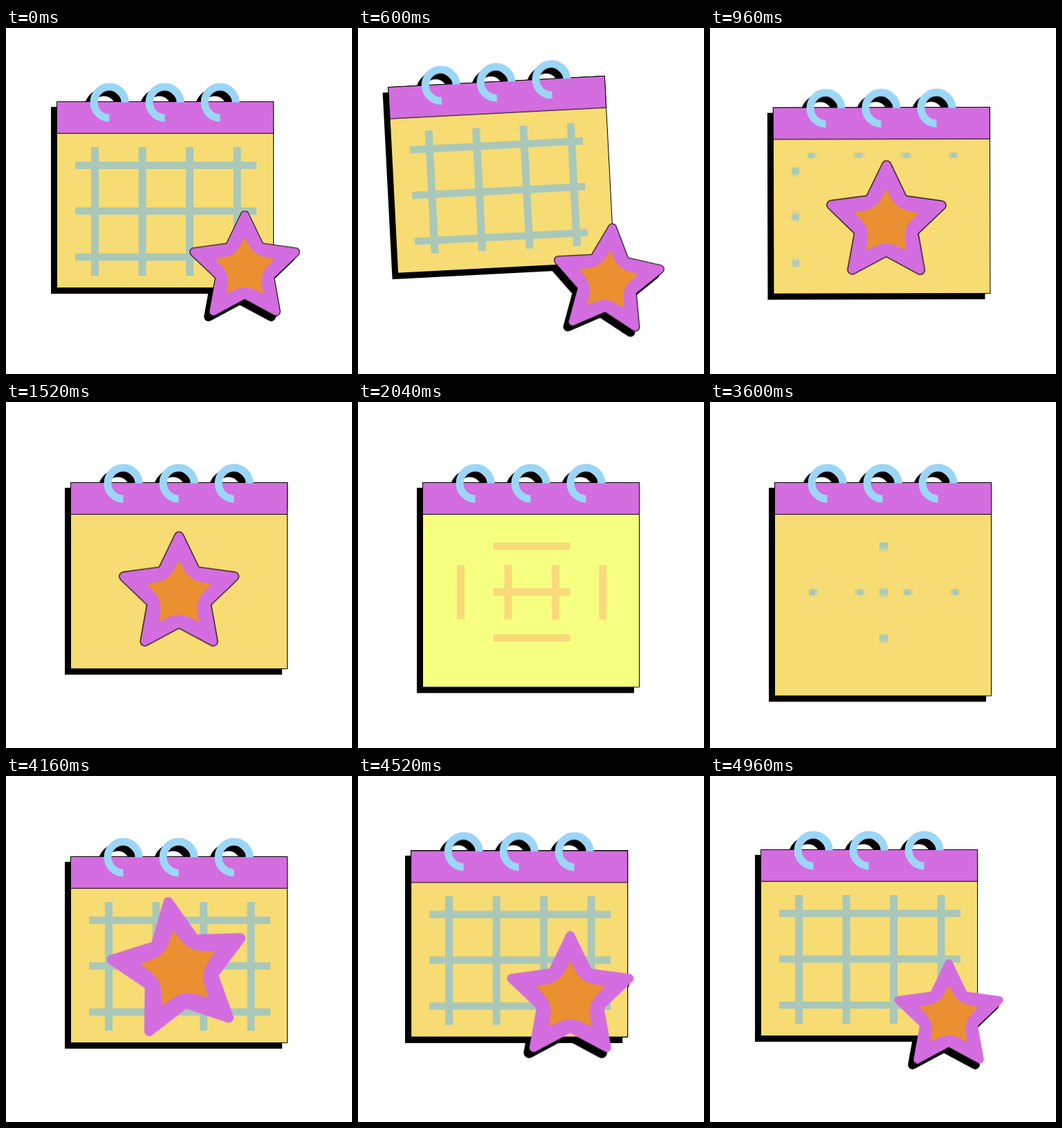
Animation of 500x500 px, one loop 5000 ms. Source, as an HTML page:

```html
<!DOCTYPE html>
<html lang="en">
<head>
<meta charset="utf-8">
<title>Calendar star</title>
<style>
  html, body { margin: 0; width: 100%; height: 100%; overflow: hidden; background: #fff; }
  svg { display: block; width: 100%; height: 100%; stroke-linejoin: round; }

  .cal, .star1, .star2, .drop2, .drop3, .mini, .gx, .gy {
    animation: 5s cubic-bezier(.333, 0, .667, 1) infinite both;
  }
  .edge { stroke: #000; vector-effect: non-scaling-stroke; }
  .sun { fill: #f7dc73; }
  .lime { fill: #f7ff80; }
  .teal { stroke: #a9c8b9; }
  .sand { stroke: #f8da7a; }
  .black { fill: #000; stroke: #000; stroke-width: 13.2; }
  .pink { fill: #d36de0; stroke: #d36de0; stroke-width: 11; }
  .orange { fill: #ea9031; }

  .cal { animation-name: sway; transform-origin: 250px 251px; }
  @keyframes sway {
    0%, 100% { transform: translate(-20px, -10px) rotate(0deg); }
    10.8% { transform: translate(-45px, -41px) rotate(-3.1deg); }
    20.4%, 83.2% { transform: translate(0px, 0px) rotate(0deg); }
    92.8% { transform: translate(-20px, -10px) rotate(0deg); }
  }

  .star1 { animation-name: gather; }
  @keyframes gather {
    0% { transform: translate(345px, 347.5px) rotate(0deg) scale(1); visibility: visible; }
    10.8% { transform: translate(366px, 370px) rotate(5.2deg) scale(1); }
    20.4% { transform: translate(250px, 278px) rotate(0deg) scale(1.09); }
    40%, 100% { transform: translate(250px, 278px) rotate(0deg) scale(1.09); visibility: hidden; }
  }

  .star2 { animation-name: burst; }
  @keyframes burst {
    0%, 79.2% {
      transform: translate(251px, 280px) rotate(-120deg) scale(0);
      animation-timing-function: cubic-bezier(.333, .667, .667, 1);
    }
    84.8% { transform: translate(251px, 280px) rotate(0deg) scale(1.4); }
    94.8%, 100% { transform: translate(345px, 347.5px) rotate(0deg) scale(1); }
  }

  /* A fresh page falls from the header, overshoots and settles. */
  .drop2 { animation-name: drop2; }
  .drop3 { animation-name: drop3; }
  .page { transform-origin: 0 116.5px; }
  .shade { transform-origin: 0 124.5px; }
  @keyframes drop2 {
    0%, 29% { transform: scaleY(0); }
    35.4% { transform: scaleY(1.169); }
    47.6%, 100% { transform: scaleY(1); }
  }
  @keyframes drop3 {
    0%, 63.2% { transform: scaleY(0); }
    69.6% { transform: scaleY(1.169); }
    80%, 100% { transform: scaleY(1); }
  }

  /* The first grid retracts to its top left ends, later ones grow from the middle. */
  .gx, .gy { transform-origin: 251px 275px; }
  .g1 .gx, .g1 .gy { transform-origin: 120px 182px; }
  .g1 .gx { animation-name: out1x; }
  .g1 .gy { animation-name: out1y; }
  .g2 .gx { animation-name: in2x; }
  .g2 .gy { animation-name: in2y; }
  .g3 .gx { animation-name: in3x; }
  .g3 .gy { animation-name: in3y; }
  @keyframes out1x { 0%, 10.8% { transform: scaleX(1); } 20.4%, 100% { transform: scaleX(0); } }
  @keyframes out1y { 0%, 10.8% { transform: scaleY(1); } 20.4%, 100% { transform: scaleY(0); } }
  @keyframes in2x { 0%, 36.6% { transform: scaleX(0); } 46%, 100% { transform: scaleX(1); } }
  @keyframes in2y { 0%, 36.6% { transform: scaleY(0); } 46%, 100% { transform: scaleY(1); } }
  @keyframes in3x { 0%, 70.8% { transform: scaleX(0); } 80%, 100% { transform: scaleX(1); } }
  @keyframes in3y { 0%, 70.8% { transform: scaleY(0); } 80%, 100% { transform: scaleY(1); } }

  .mini { fill: #ea9031; stroke: #332a20; stroke-width: .7; stroke-linejoin: miter; }
  .m1 { animation-name: pop1; }
  .m2 { animation-name: pop2; }
  @keyframes pop1 { 0%, 47.6% { transform: scale(0); } 54%, 100% { transform: scale(1); } }
  @keyframes pop2 { 0%, 54% { transform: scale(0); } 60.4%, 100% { transform: scale(1); } }
</style>
</head>
<body>
<svg viewBox="0 0 500 500">
  <defs>
    <path id="body"/>
    <path id="core"/>
    <path id="spark"/>
    <path id="rows" d="M120 208.5H382M120 274.5H382M120 341H382" fill="none" stroke-width="10.5"/>
    <path id="cols" d="M148.5 182V368M217 182V368M285.5 182V368M354 182V368" fill="none" stroke-width="11"/>
    <path id="ring" d="M169.5 140a22.5 22.5 0 1 1 22.5-22.5" fill="none" stroke-width="11"/>
    <g id="rings">
      <use href="#ring"/>
      <use href="#ring" x="80"/>
      <use href="#ring" x="160"/>
    </g>
  </defs>

  <g transform="translate(-7 7.5)">
    <use class="star1 black" href="#body"/>
    <use class="star2 black" href="#body"/>
  </g>

  <g class="cal">
    <use href="#rings" x="-8" y="8" stroke="#000"/>
    <rect class="edge" x="85.5" y="124.5" width="313" height="269"/>
    <rect class="edge shade drop2" x="85.5" y="124.5" width="313" height="269"/>
    <rect class="edge shade drop3" x="85.5" y="124.5" width="313" height="269"/>
    <rect class="edge sun" x="93.5" y="116.5" width="313" height="269"/>
    <g class="g1 teal">
      <use class="gx" href="#rows"/>
      <use class="gy" href="#cols"/>
    </g>
  </g>

  <g class="star1">
    <use class="black" href="#body"/>
    <use class="pink" href="#body"/>
    <use class="orange" href="#core"/>
  </g>

  <g class="cal">
    <rect class="edge lime page drop2" x="93.5" y="116.5" width="313" height="269"/>
    <g class="g2 sand">
      <use class="gx" href="#rows"/>
      <use class="gy" href="#cols"/>
    </g>
    <g transform="translate(319.5 307.8)"><use class="mini m1" href="#spark"/></g>
    <g transform="translate(251 241)"><use class="mini m2" href="#spark"/></g>
    <rect class="edge sun page drop3" x="93.5" y="116.5" width="313" height="269"/>
    <g class="g3 teal">
      <use class="gx" href="#rows"/>
      <use class="gy" href="#cols"/>
    </g>
    <rect class="edge" x="93.5" y="116.5" width="313" height="45.8" fill="#d36de0"/>
    <use href="#rings" stroke="#9bd6f6"/>
  </g>

  <g class="star2">
    <use class="pink" href="#body"/>
    <use class="orange" href="#core"/>
  </g>
</svg>
<script>
  // Ten star corners, alternating outer and inner radius.
  const corners = (outer, inner, dy = 0) => Array.from({ length: 10 }, (_, i) => {
    const r = i % 2 ? inner : outer, a = i * Math.PI / 5;
    return [r * Math.sin(a), dy - r * Math.cos(a)];
  });
  const sharp = pts => 'M' + pts.map(p => p.join(' ')).join('L') + 'Z';
  const mid = (p, q) => [(p[0] + q[0]) / 2, (p[1] + q[1]) / 2];

  // Pointed tips with rounded hollows.
  const hollow = pts => {
    let d = 'M' + pts[0];
    for (let i = 1; i < 10; i += 2) {
      const tip = pts[(i + 1) % 10];
      d += `L${mid(pts[i - 1], pts[i])}Q${pts[i]} ${mid(pts[i], tip)}L${tip}`;
    }
    return d + 'Z';
  };

  const draw = (id, d) => document.getElementById(id).setAttribute('d', d);
  draw('body', sharp(corners(77, 38)));
  draw('core', hollow(corners(45, 24)));
  draw('spark', sharp(corners(33.7, 15.7, 3.2)));
</script>
</body>
</html>
```
